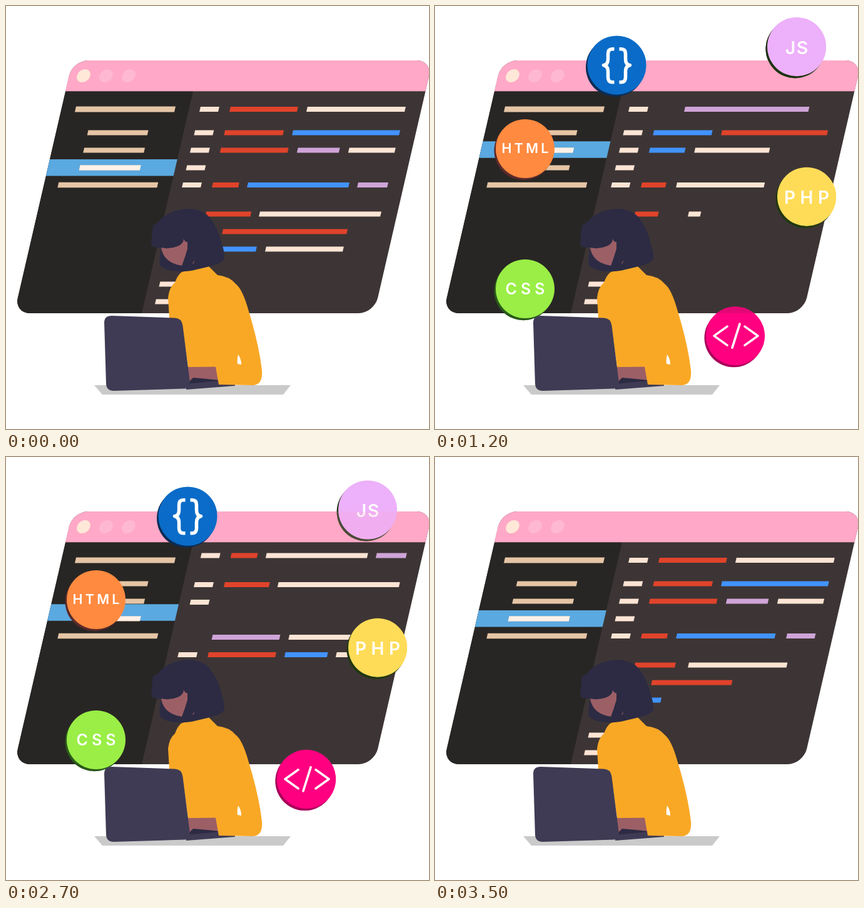
Recreate the animation shown at these times as an HTML page. Size 676 by 676 pixels, loop 3530 ms.

```html
<!DOCTYPE html>
<html lang="en">
<head>
<meta charset="utf-8">
<title>Coding</title>
<style>
html, body { margin: 0; width: 100%; height: 100%; overflow: hidden; background: #fff; }
svg { display: block; width: 100vw; height: 100vh; }
text { font-family: Inter, "Open Sans", sans-serif; font-weight: 600; fill: #fff; text-anchor: middle; }
</style>
</head>
<body>
<svg id="stage" viewBox="0 0 676 676" xmlns="http://www.w3.org/2000/svg">
  <defs>
    <clipPath id="screen">
      <rect x="95" y="87" width="575.5" height="404" rx="25" transform="matrix(1 0 -.231 1 31.4 0)"/>
    </clipPath>
    <clipPath id="bandClip"><rect id="bandHole" x="95" y="245" width="204" height="26.5"/></clipPath>
  </defs>

  <g id="back"></g>

  <g clip-path="url(#screen)">
    <g transform="matrix(1 0 -.231 1 31.4 0)">
      <rect x="95" y="87" width="576" height="404" fill="#3d3535"/>
      <rect x="95" y="136" width="204" height="355" fill="#282624"/>
      <rect id="band" x="95" y="245" width="204" height="26.5" fill="#5aa9e0"/>
      <g id="menu" fill="#e5c5a5"></g>
      <g id="menuLit" fill="#fff1e8" clip-path="url(#bandClip)"></g>
      <g id="code"></g>
      <rect x="90" y="80" width="590" height="56.3" fill="#ffa8c7"/>
      <circle cx="118.3" cy="111.5" r="10.6" fill="#ffe8d8"/>
      <circle cx="154.3" cy="111.5" r="10.6" fill="#ffb8d1"/>
      <circle cx="190.3" cy="111.5" r="10.6" fill="#ffb8d1"/>
    </g>
  </g>

  <g id="front"></g>

  <g id="woman">
    <path fill="#cacaca" d="M141 606H455L443 621H154Z"/>
    <path fill="#9c5f66" d="M288 575H338L341 601L292 602Z"/>
    <path fill="#2c2b43" d="M292 601L299 594L322 596L341 598L341 606L292 612Z"/>
    <path fill="#3f3b54" d="M288 604L340 599L366 605L366 607L288 613Z"/>
    <path fill="#f9a826" fill-rule="evenodd" d="M281 425L324 416L338 430Q357 432 367 444Q378 452 388 488Q404 540 409 582Q411 606 394 606L340 605L335 576.5L291 577L282 512L261 499L259 466Q261 449 270 442Q274 430 281 425Z
      M371 557Q376 564 376 573L370 572Q369 564 371 557Z"/>
    <path fill="#3f3b54" d="M157 506Q157 495 169 495L270 498.500Q281 499 282.500 511L294 602Q294 611 286 611.500L172 615Q161 615 160 604Z"/>
    <path fill="#2c2b43" d="M235 350Q245 346 249 339Q268 323 297 324Q318 327 327 340Q339 355 345 380Q350 395 349 404Q344 412 330 415Q318 418 305 421Q290 425 272 424Q254 423 246 415Q244 405 248 387L236 385Q232 384 232 377Z"/>
    <path fill="#9c5f66" d="M248 386Q262 389 274 384Q284 380 284 372Q286 378 290 377L290 388Q286 402 281 415Q262 412 254 401Q249 394 248 386Z"/>
    <path fill="#9c5f66" d="M301 406L298 412L300 411Z"/>
  </g>
</svg>
<script>
const LOOP = 3530, PAGE = 371, RISE = 94, MOVE = 467;
const $ = id => document.getElementById(id);

function add(parent, tag, attrs) {
  const el = document.createElementNS('http://www.w3.org/2000/svg', tag);
  for (const k in attrs) el.setAttribute(k, attrs[k]);
  parent.appendChild(el);
  return el;
}

// eased progress of a move that begins at start and lasts span
function ease(t, start, span) {
  const u = Math.min(1, Math.max(0, (t - start) / span));
  return u * u * (3 - 2 * u);
}
const grow = age => age <= 0 ? 0 : 1 - 2 ** (-age / 65.6);

// sidebar: y, x, width, height
const items = [[165, 117.7, 159, 9], [202.5, 146, 96, 8], [230.5, 146, 97, 8], [258.5, 146, 97, 8], [286, 118, 159, 8.5]];
for (const [y, x, width, height] of items)
  for (const id of ['menu', 'menuLit']) add($(id), 'rect', { x, y: y - height / 2, width, height });

// code pages: y, then "colour x width" for each bar
const ink = { r: '#e0432b', w: '#fde4d4', b: '#4293ff', p: '#cfa4d8' };
const numbered = [165, 202.5, 230.5, 258.5, 286, 332.5, 360.5, 444.5, 472.5];
const pageA = [
  [165, 'r 364.6 108', 'w 487.6 157'],
  [202.5, 'r 364.6 94', 'b 473.4 171'],
  [230.5, 'r 364.6 108', 'p 487.6 67', 'w 569.6 74'],
  [286, 'r 364.6 42', 'b 420.7 162', 'p 596.7 48'],
  [332.5, 'r 364.6 72', 'w 450.4 194'],
  [360.5, 'r 398 199'],
  [388.5, 'b 400.3 58', 'w 473.3 124']
];
const pageB = [
  [165, 'p 405.7 199'],
  [202.5, 'b 364.6 94', 'r 473.4 171'],
  [230.5, 'b 364.6 58', 'w 437 124'],
  [286, 'r 364.6 42', 'w 420.7 162', 'p 596.7 48'],
  [332.5, 'r 364.6 72', 'w 450.4 194'],
  [416.5, 'p 364.6 108', 'w 487.3 157'],
  [444.5, 'r 364.6 108', 'b 487.3 68', 'w 569.3 75']
];

const bars = [];
function addBar(y, x, width, fill, start) {
  const el = add($('code'), 'rect', { x, y: y - 4, width, height: 8, fill });
  bars.push({ el, width, start });
}
function addPage(rows, top, dashStart, barStart) {
  const step = 60;
  numbered.forEach((y, i) => addBar(y + top, 316.7, 30, ink.w, dashStart + i * step));
  let n = 0;
  for (const [y, ...list] of rows)
    for (const bar of list) {
      const [c, x, w] = bar.split(' ');
      addBar(y + top, +x, +w, ink[c], barStart + n++ * step);
    }
}
addPage(pageA, 0, -1e5, -1e5);
addPage(pageB, PAGE, 595, 651);
addPage(pageA, PAGE * 2, 2686, 2683);

// badges
const word = (label, size, gap, base) => g =>
  add(g, 'text', { x: gap / 2, y: base, 'font-size': size, 'letter-spacing': gap }).textContent = label;
const lines = (d, width, cap) => g =>
  add(g, 'path', { d, fill: 'none', stroke: '#fff', 'stroke-width': width, 'stroke-linecap': cap, 'stroke-linejoin': 'round' });
const half = s => `M${s * 4} -26h${s * 3}q${s * 7} 0 ${s * 7} 8v8q0 9 ${s * 7} 10q${s * -7} 1 ${s * -7} 10v9q0 8 ${s * -7} 8h${s * -3}`;

const badges = [
  { x: 578, y: 65.2, fill: '#edb0fa', shade: '#1d3312', start: 5, mark: word('JS', 28.5, 1.5, 11.5) },
  { x: 290.5, y: 94.7, fill: '#0a6cc8', shade: '#0c2c55', start: 140, mark: lines(half(-1) + half(1), 5.5, 'butt') },
  { x: 144, y: 228, fill: '#ff8a40', shade: '#5a2a2a', start: 280, mark: word('HTML', 21.5, 4.2, 7.2) },
  { x: 594, y: 304.7, fill: '#ffdc58', shade: '#20380f', start: 531, mark: word('PHP', 28, 7.5, 11.3) },
  { x: 144, y: 452, fill: '#9aee46', shade: '#2a5a1a', start: 680, mark: word('CSS', 25, 6, 9) },
  { x: 480, y: 514.8, fill: '#ff0080', shade: '#a8005a', start: 840, mark: lines('M-13 -15L-34 0L-13 15M7 -19L-5 19M15 -15L36 0L15 15', 3.6, 'round') }
];
function drawBadge(parent, b) {
  const g = add(parent, 'g', {});
  add(g, 'circle', { cx: -2.5, cy: 3.2, r: 47, fill: b.shade });
  add(g, 'circle', { r: 47, fill: b.fill });
  b.mark(g);
  return g;
}
badges.forEach((b, i) => {
  b.end = 2565 + i * 133.3;
  b.solid = drawBadge($('back'), b);
  b.wrap = add($('front'), 'g', {});
  b.soft = drawBadge(b.wrap, b);
});

function draw(t) {
  const scroll = PAGE * (ease(t, 345, 591) + ease(t, 2428, 689));
  $('code').setAttribute('transform', `translate(0 ${-scroll})`);
  for (const b of bars) b.el.setAttribute('width', b.width * grow(t - b.start));

  const bandY = 245 - 28.7 * (ease(t, 178, MOVE) - ease(t, 2417, MOVE));
  $('band').setAttribute('y', bandY);
  $('bandHole').setAttribute('y', bandY);

  for (const b of badges) {
    const p = ease(t, b.start, MOVE) - ease(t, b.end, MOVE);
    const place = `translate(${b.x} ${b.y + RISE * (1 - p)})`;
    b.soft.setAttribute('transform', place);
    b.solid.setAttribute('transform', place);
    b.soft.setAttribute('opacity', p);
    // beyond the window a badge is either fully there or not at all
    b.solid.setAttribute('opacity', p > 0.47 ? 1 : 0);
    b.wrap.setAttribute('clip-path', p > 0.999 ? 'none' : 'url(#screen)');
  }
}

const begin = performance.now();
function tick() {
  draw((performance.now() - begin) % LOOP);
  requestAnimationFrame(tick);
}
tick();
</script>
</body>
</html>
```
